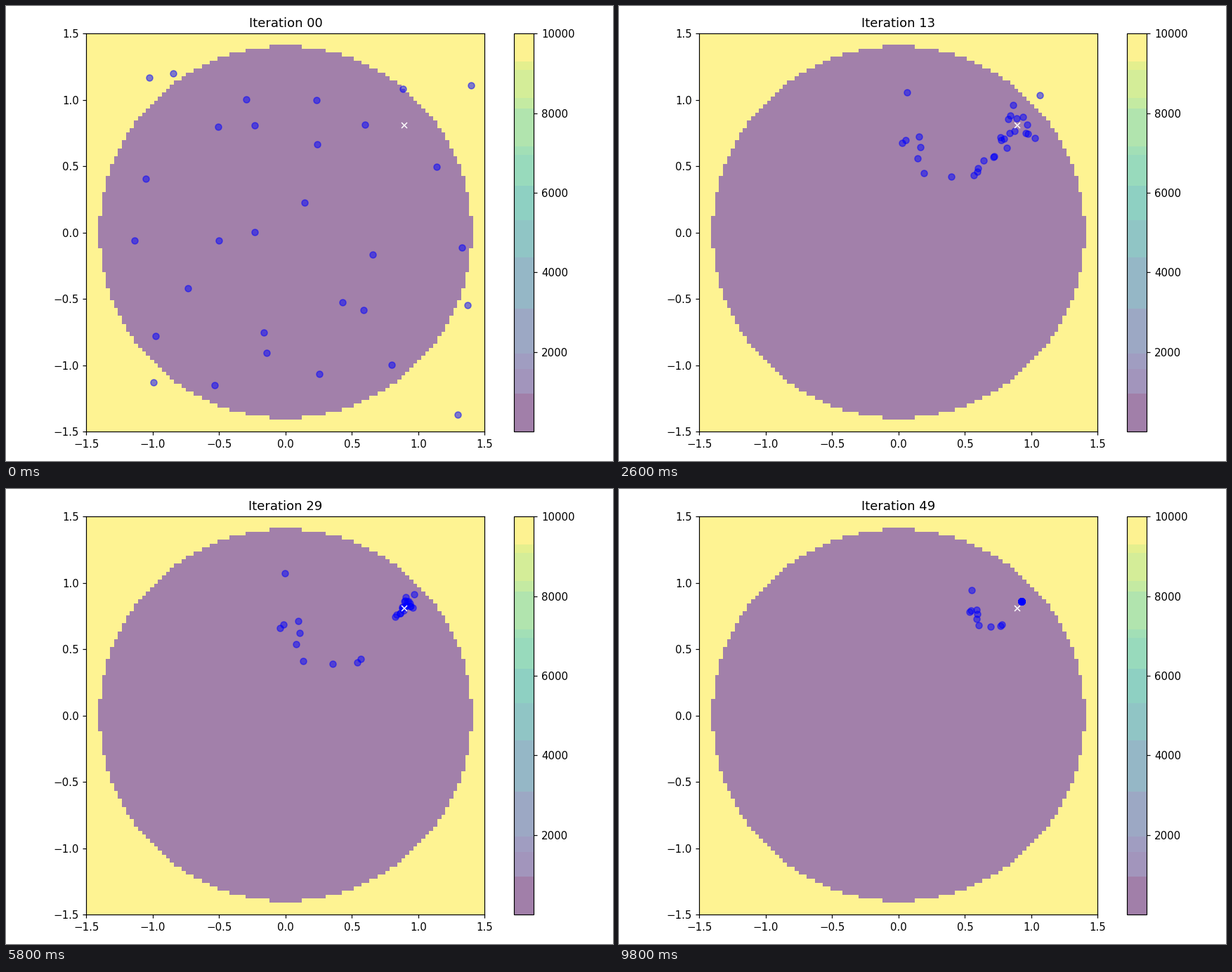
Animation of 864 by 648 pixels, one loop 10 s. Source, as a matplotlib script:

```python
import numpy as np
import matplotlib.pyplot as plt
from matplotlib.animation import FuncAnimation
from matplotlib.colors import BoundaryNorm, ListedColormap

GATHERED, LAST = 9, 49
GOAL = np.array([0.925, 0.86])
rng = np.random.default_rng(4)

# Start: jittered 6 x 5 grid, so the swarm fills the whole square.
cells = np.array([(c, r) for c in range(6) for r in range(5)])
jitter = rng.uniform(0.05, 0.95, cells.shape)
START = -1.42 + 2.85 * (cells + jitter) / (6, 5)

# Stragglers keep one shape that swells and shrinks about the goal.
SHAPE = np.array([
    (-0.75, 0.17), (-0.67, -0.12), (-0.66, -0.19), (-0.76, -0.14),
    (-0.78, -0.16), (-0.68, -0.26), (-0.64, -0.36), (-0.46, -0.38),
    (-0.31, -0.37), (-0.29, -0.35)])
SWELL_AT = [9, 17, 20, 24, 29, 33, 37, 42, 46, 49]
SWELL = [0.82, 1.48, 1.62, 1.41, 1.24, 0.95, 1.0, 1.27, 0.98, 0.5]

# The other particles form a slanted cloud that closes in on the goal.
noise = rng.normal(size=(len(START) - len(SHAPE), 2))
noise = (noise - noise.mean(axis=0)) / noise.std(axis=0)
noise[:, 0] = 0.8 * noise[:, 0] + 0.6 * noise[:, 1]
CLOUD = (-0.1, -0.14) + noise * (0.13, 0.17)


def converge(i):
    shrink = (1 - (i - GATHERED) / (LAST - GATHERED)) ** 2
    swell = np.interp(i, SWELL_AT, SWELL)
    return GOAL + np.vstack([SHAPE * swell, CLOUD * shrink])


def swarm(i):
    if i >= GATHERED:
        return converge(i)
    remaining = (1 - i / GATHERED) ** 1.3
    gathered = converge(GATHERED)
    return gathered + (START - gathered) * remaining


fig, ax = plt.subplots(figsize=(8, 6), dpi=108, facecolor="white")

# Stepped viridis scale
edges = np.array([0, 950, 1570, 1960, 3090, 4370, 5320, 6170, 6960, 7160,
                  8110, 8380, 9090, 9300, 10000])
shades = (edges[:-1] + edges[1:]) / 2
shades[0], shades[-1] = edges[0], edges[-1]
steps = ListedColormap(plt.get_cmap("viridis")(shades / edges[-1]))

grid = np.linspace(-1.5, 1.5, 100)
gx, gy = np.meshgrid(grid, grid)
cost = np.where(gx ** 2 + gy ** 2 > 2, edges[-1], 0)
image = ax.imshow(cost, extent=(-1.5, 1.5, -1.5, 1.5), origin="lower",
                  cmap=steps, norm=BoundaryNorm(edges, steps.N), alpha=0.5,
                  interpolation="nearest")
bar = fig.colorbar(image, ax=ax, spacing="proportional",
                   ticks=range(2000, 10001, 2000))
bar.minorticks_off()

dots, = ax.plot([], [], "o", color="blue", alpha=0.5, markersize=6, zorder=3)
ax.plot([0.893], [0.807], "x", color="white", markersize=5, zorder=4)
ax.set(xlim=(-1.5, 1.5), ylim=(-1.5, 1.5),
       xticks=np.arange(-1.5, 1.6, 0.5), yticks=np.arange(-1.5, 1.6, 0.5))
title = ax.set_title("Iteration 00")

# The square axes need a second pass for the margins to settle.
for _ in range(2):
    fig.tight_layout()


def update(i):
    dots.set_data(*swarm(i).T)
    title.set_text(f"Iteration {i:02d}")
    return dots, title


anim = FuncAnimation(fig, update, frames=LAST + 1, interval=200, repeat=True,
                     repeat_delay=0, blit=False)
plt.show()
```
